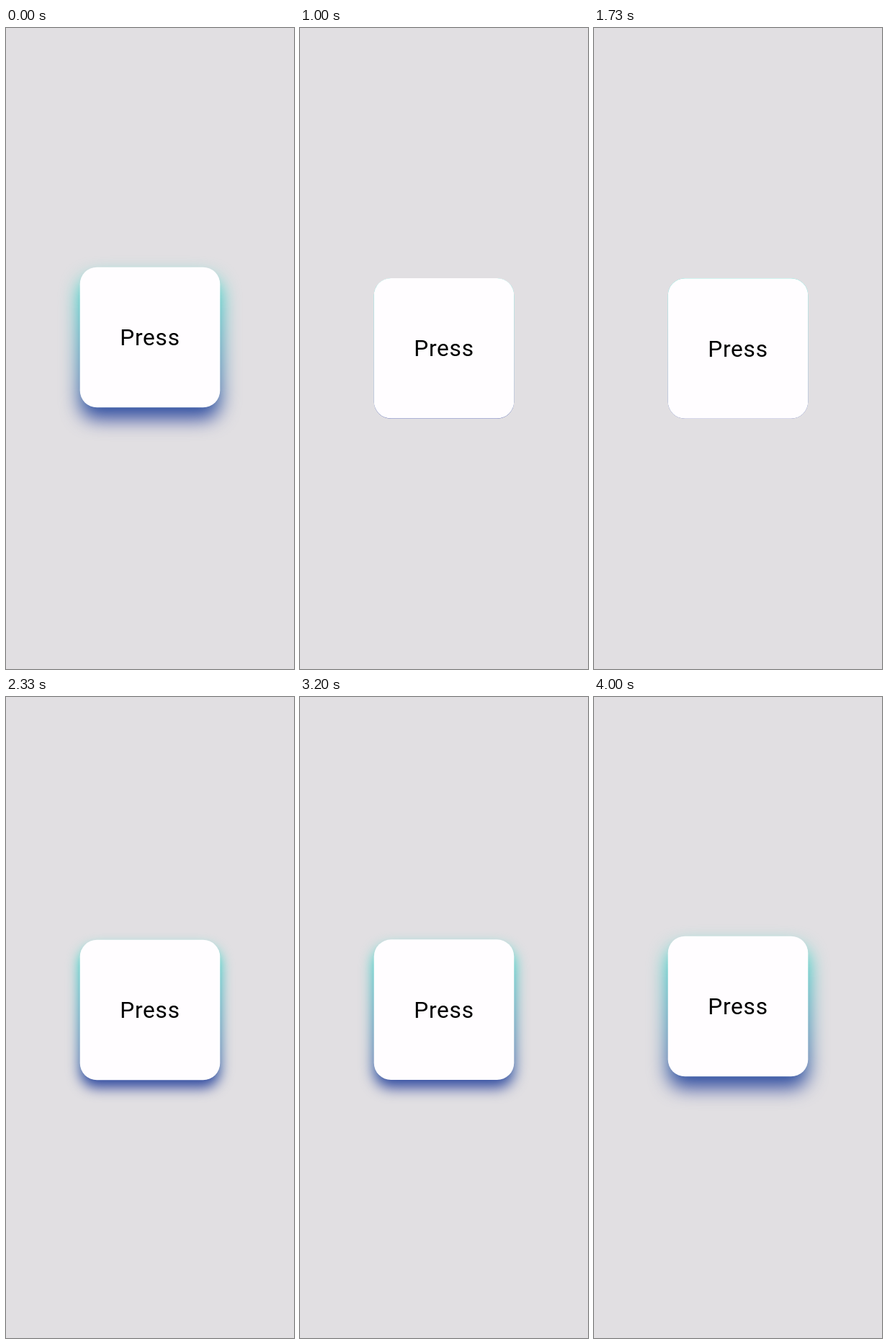
Write an HTML page with a canvas that moves like this. It is 400 px wide and 889 px high and loops after 4.07 s.

```html
<!DOCTYPE html>
<html lang="en">
<head>
<meta charset="utf-8">
<title>Press</title>
<style>
  html, body { margin: 0; width: 100%; height: 100%; overflow: hidden; background: #e1dfe2; }
  canvas { display: block; width: 400px; height: 889px; }
</style>
</head>
<body>
<canvas></canvas>
<script>
const W = 400, H = 889, LOOP = 4070;
const TICK = 1000 / 15, LAST_TICK = 60;
const SIZE = 194.6, RADIUS = 23.6, LIFT = 15.5, BLUR = 13;
const LEFT = (W - SIZE) / 2, REST = (H - SIZE) / 2;
const OMEGA = Math.sqrt(1500);

// Each toggle: first tick, number of ticks, spring time already elapsed (ms).
const toggles = [
  [4, 4, 15], [15, 4, 5], [23, 4, 7], [35, 3, 60],
  [40, 4, 15], [48, 3, 63], [52, 4, 20], [58, 3, 55]
];

const canvas = document.querySelector('canvas');
const ctx = canvas.getContext('2d');
const dpr = window.devicePixelRatio || 1;
canvas.width = Math.round(W * dpr);
canvas.height = Math.round(H * dpr);
ctx.scale(dpr, dpr);

const glow = ctx.createLinearGradient(0, REST, 0, REST + SIZE);
glow.addColorStop(0, '#18dec6');
glow.addColorStop(1, '#2f3f9c');

// Critically damped spring from 0 to 1.
function spring(ms) {
  const x = OMEGA * ms / 1000;
  return 1 - (1 + x) * Math.exp(-x);
}

// 1 when the key is raised, 0 when it is pressed.
function liftAt(ms) {
  const tick = Math.min(LAST_TICK, Math.floor((ms + 3.4) / TICK));
  let lift = 1;
  toggles.forEach(([start, count, lead], i) => {
    const n = tick - start;
    if (n < 0) return;
    const done = n >= count - 1 ? 1 : spring(lead + n * TICK);
    lift = i % 2 ? done : 1 - done;
  });
  return lift;
}

function square(y, fill) {
  ctx.fillStyle = fill;
  ctx.beginPath();
  ctx.roundRect(LEFT, y, SIZE, SIZE, RADIUS);
  ctx.fill();
}

function draw(ms) {
  const lift = liftAt(ms);
  const top = REST - LIFT * lift;

  ctx.fillStyle = '#e1dfe2';
  ctx.fillRect(0, 0, W, H);

  ctx.filter = `blur(${(0.4 + BLUR * lift) * dpr}px)`;
  square(REST, glow);
  ctx.filter = 'none';
  square(top, '#fffdff');

  ctx.fillStyle = '#000';
  ctx.font = '31.6px Roboto, sans-serif';
  ctx.letterSpacing = '0.75px';
  ctx.textAlign = 'left';
  ctx.textBaseline = 'alphabetic';
  const word = 'Press';
  ctx.fillText(word, (W - ctx.measureText(word).width) / 2, top + SIZE / 2 + 11);
}

const began = performance.now();
function loop() {
  draw((performance.now() - began) % LOOP);
  requestAnimationFrame(loop);
}
loop();
</script>
</body>
</html>
```
